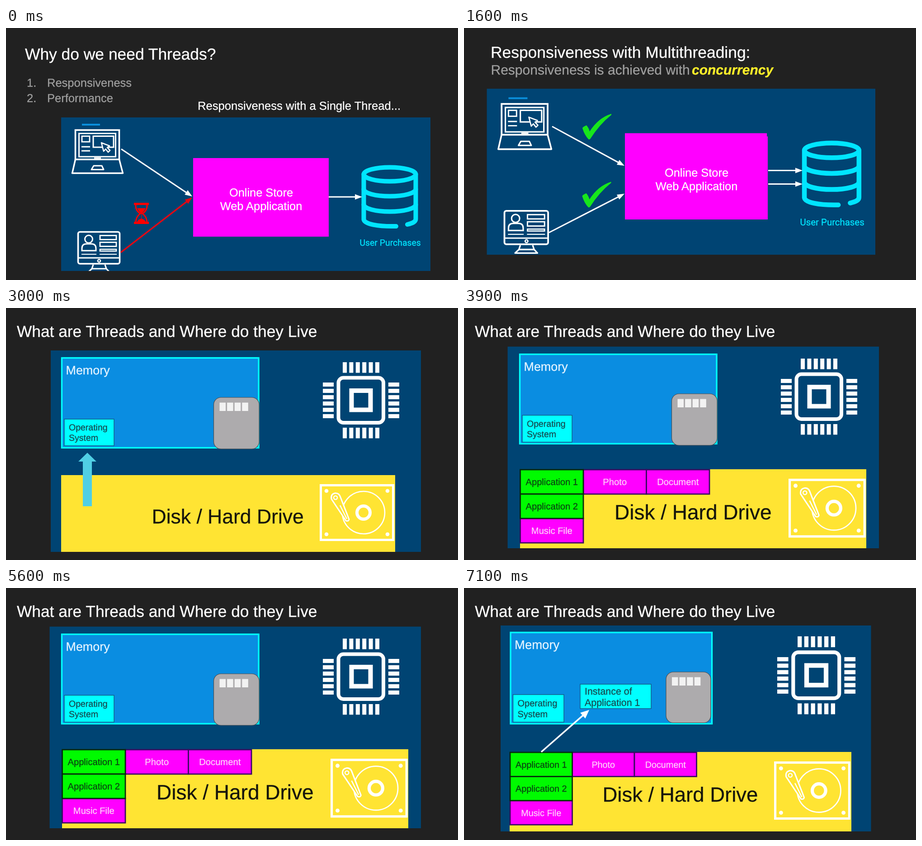
Recreate the animation shown at these times as an HTML page. Size 1000 px wide and 558 px high, loop 7.2 s.

```html
<!DOCTYPE html>
<html lang="en">
<head>
<meta charset="utf-8">
<title>Threads slides</title>
<style>
  html, body { margin: 0; width: 100%; height: 100%; overflow: hidden; background: #212121; }
  svg { display: block; width: 100%; height: 100%; }
  text { font-family: "Liberation Sans", Arial, sans-serif; text-rendering: geometricPrecision; stroke-width: 0.3px; }
  .roboto { font-family: Roboto, sans-serif; }
</style>
</head>
<body>
<svg id="stage" viewBox="0 0 1000 558" xmlns="http://www.w3.org/2000/svg"></svg>
<script>
const NAVY = '#004473', CYAN = '#00e5ff', AQUA = '#00ffff', MAGENTA = '#ff00ff',
      GREEN = '#00fb00', YELLOW = '#ffe433', GREY = '#a0a0a0', WHITE = '#fff';
const LOOP = 7200;

// Drawing helpers. Boxes are given by their left, top, right and bottom edges.
const box = (l, t, r, b, fill, extra = '') =>
  `<rect x="${l}" y="${t}" width="${r - l}" height="${b - t}" fill="${fill}" ${extra}/>`;
const frame = (l, t, r, b, width, color = WHITE, extra = '') =>
  box(l, t, r, b, 'none', `stroke="${color}" stroke-width="${width}" ${extra}`);
const text = (x, y, size, str, fill = WHITE, extra = '') =>
  `<text x="${x}" y="${y}" font-size="${size}" fill="${fill}" stroke="${fill}" ${extra}>${str}</text>`;
const centered = (x, y, size, str, fill) => text(x, y, size, str, fill, 'text-anchor="middle"');
const path = (d, fill, extra = '') => `<path d="${d}" fill="${fill}" ${extra}/>`;
const stroke = (d, width, color = WHITE, extra = '') =>
  path(d, 'none', `stroke="${color}" stroke-width="${width}" ${extra}`);
const dot = (x, y, r, fill, extra = '') => `<circle cx="${x}" cy="${y}" r="${r}" fill="${fill}" ${extra}/>`;
const place = (x, y, scale, content) =>
  `<g transform="translate(${x} ${y}) scale(${scale})">${content}</g>`;
const repeat = (n, draw) => Array.from({ length: n }, (_, i) => draw(i)).join('');

function arrow(x1, y1, x2, y2, color = WHITE, width = 3, head = 16, half = 6) {
  const len = Math.hypot(x2 - x1, y2 - y1);
  const angle = Math.atan2(y2 - y1, x2 - x1) * 180 / Math.PI;
  return `<g transform="translate(${x1} ${y1}) rotate(${angle})">` +
    stroke(`M0 0H${len - head + 1}`, width, color) +
    path(`M${len} 0l${-head} ${-half}v${2 * half}z`, color) + '</g>';
}

const ROUND = 'stroke-linejoin="round"';

const laptop =
  stroke('M168 214H208', 4, '#0a8fdc') +
  frame(153.5, 226, 250.5, 291, 3.6) +
  frame(161.5, 233.5, 242.5, 285, 3) +
  frame(168, 239.5, 185, 252, 2.8) +
  stroke('M167 263H186M167 272H186', 2.8) +
  frame(193, 239.5, 238, 264, 3) +
  stroke('M195 288H210', 3) +
  stroke('M153.500 291L146.500 321.500H258.500L250.500 291', 3.4, WHITE, ROUND) +
  stroke('M194 305H212L216 313.500H189Z', 3, WHITE, ROUND) +
  path('M211 254L216 273L220.500 268L226 275L230 271L224 264.500L229 261Z', NAVY,
    `stroke="#fff" stroke-width="2.6" ${ROUND}`);

const monitor =
  frame(159.5, 451.5, 251.5, 522, 3.6, WHITE, 'rx="4"') +
  stroke('M161 509H251', 3) +
  dot(183, 467.5, 8.5, 'none', 'stroke="#fff" stroke-width="3"') +
  stroke('M168 493V488Q168 478 178 478H189Q199 478 199 488V493Z', 3) +
  repeat(2, i => frame(208, 459.5 + i * 15, 244, 468.5 + i * 15, 2.8)) +
  frame(208, 490, 244, 494, 2.6) +
  stroke('M167 501H200M207 501H245', 2.2) +
  dot(206, 515.5, 3, 'none', 'stroke="#fff" stroke-width="2.6"') +
  stroke('M193 524L190 533L182 540.500H229L222 533L219 524M190 533H222', 3.2, WHITE, ROUND);

const database = `<g fill="none" stroke="${CYAN}" stroke-width="10" stroke-linecap="round">
  <ellipse cx="849" cy="324" rx="57.500" ry="15.500"/>
  <path d="M791.500 324V424C793 434 822 440 863 439M888 435C900 432 906.500 429 906.500 423V324"/>
  <path d="M791.500 357A57.500 15.500 0 0 0 906.500 357M791.500 391A57.500 15.500 0 0 0 906.500 391"/></g>`;

const hourglass =
  path('M283 387H316V392H283ZM283 429H316V434H283Z', '#f00') +
  stroke('M287 391V396Q288 405 297 411Q288 417 287 430M312 391V396Q311 405 302 411Q311 417 312 430', 3, '#f00') +
  path('M290 399H309Q306 405 300 411V422Q307 424 309 429H290Q292 424 299 422V411Q293 405 290 399Z', '#f00');

const check = path('M262 222Q262 219 271 215.500Q276 221 278 229Q297 199 326 190V192.500Q300 213 279 246L276 247Q267 238 262 222Z', '#17e61c');

const icons = laptop + monitor + database;

const storeLabel = (x, y) =>
  centered(x, y, 25.4, 'Online Store') + centered(x, y + 30.5, 25.4, 'Web Application');

const singleThread = () =>
  text(42, 70, 35.4, 'Why do we need Threads?') +
  text(46, 130, 25.5, '1.', GREY) + text(91, 130, 25.5, 'Responsiveness', GREY) +
  text(46, 164, 25.5, '2.', GREY) + text(91, 164, 25.5, 'Performance', GREY) +
  text(424, 181, 25.6, 'Responsiveness with a Single Thread...') +
  box(122, 198, 939, 538, NAVY) +
  `<clipPath id="panel">${box(122, 198, 939, 538, WHITE)}</clipPath><g clip-path="url(#panel)">${icons}</g>` +
  arrow(255, 268, 412, 373) +
  arrow(254, 497, 412, 375, '#e00915', 3.4) +
  hourglass +
  box(414, 288, 714, 462, MAGENTA) + storeLabel(564.5, 372.5) +
  arrow(714, 374, 788, 374) +
  text(782.5, 482, 19.4, 'User Purchases', CYAN, 'class="roboto"');

const multiThread = () =>
  text(59, 66, 35.4, 'Responsiveness with Multithreading:') +
  text(59.5, 103, 30, 'Responsiveness is achieved with', GREY) +
  text(504, 103, 30, 'concurrency', '#fff02a', 'font-weight="bold" font-style="italic"') +
  box(50.5, 134.5, 910, 502, NAVY) +
  place(-78, -69.2, 1.05, icons) +
  arrow(195, 218, 355, 305) + arrow(188, 453, 355, 367) +
  check + place(-0.5, 150.5, 1, check) +
  path('M356 233H670V240H672V424H356Z', MAGENTA) + storeLabel(514.5, 328.5) +
  arrow(673, 315.5, 749, 315.5) + arrow(673, 345.5, 749, 345.5) +
  text(743.5, 437, 20.4, 'User Purchases', CYAN, 'class="roboto"');

const title = () => text(24, 64, 35.3, 'What are Threads and Where do they Live');

// The icons below have their own top left corner at 0, 0.
const cpu =
  frame(34.5, 34.5, 134, 134, 8, WHITE, 'rx="11"') +
  frame(63.5, 63, 105.5, 105.5, 10) +
  repeat(6, i => {
    const a = 44 + i * 14.4, b = 45 + i * 14;
    return box(a, 0, a + 9, 23.5, WHITE) + box(a, 145, a + 9, 168.5, WHITE) +
      box(0, b, 24, b + 9, WHITE) + box(145, b, 169, b + 9, WHITE);
  });

const drive =
  frame(2.5, 2.5, 162.5, 123.5, 5) +
  [15, 150].map(x => dot(x, 15, 4.3, WHITE) + dot(x, 111, 4.3, WHITE)).join('') +
  dot(97, 63, 47, 'none', 'stroke="#fff" stroke-width="2.600"') +
  dot(97, 63, 14.5, 'none', 'stroke="#fff" stroke-width="7"') +
  path('M26 33Q24 22 34 20Q43 19 46 29L65 78Q64 83 58 81Z', YELLOW,
    `stroke="#fff" stroke-width="3" ${ROUND}`) +
  dot(35, 30, 4, 'none', 'stroke="#fff" stroke-width="2.400"') +
  stroke('M45 47L60 77', 2.4);

const card = (l, t, r, b) =>
  box(l, t, r, b, '#adabad', 'rx="16" stroke="#4c4c50" stroke-width="1.200"') +
  repeat(4, i => box(l + 13 + i * 16.6, t + 11.5, l + 26.5 + i * 16.6, t + 30, '#f2f2f2'));

const memory = (l, t, r, b, size) =>
  box(l, t, r, b, '#0a8de1', `stroke="${AQUA}" stroke-width="3.400"`) +
  text(l + 9, t + 36, size, 'Memory', '#e6f4ff');

const note = (l, t, r, b, size, lines, gap) =>
  box(l, t, r, b, AQUA, 'stroke="#14527c" stroke-width="1.300"') +
  lines.map((s, i) => text(l + 10, t + gap[0] + i * gap[1], size, s, '#174a50')).join('');

function files(l, t, w, h, size) {
  const tile = (col, row, name, app) => {
    const x = l + col * w, y = t + row * h;
    return box(x, y, x + w, y + h, app ? GREEN : MAGENTA,
      `stroke="${app ? '#062b0c' : '#3a0a63'}" stroke-width="2.800"`) +
      centered(x + w / 2, y + h / 2 + 7, size, name, app ? '#0a4512' : '#ffd0fb');
  };
  return tile(1, 0, 'Photo') + tile(2, 0, 'Document') + tile(0, 2, 'Music File') +
    tile(0, 0, 'Application 1', true) + tile(0, 1, 'Application 2', true);
}

const diskLabel = (x, y, size) => text(x, y, size, 'Disk / Hard Drive', '#16160c');

const osLines = ['Operating', 'System'];

const loadSystem = () =>
  title() + box(99, 94, 918, 540, NAVY) +
  memory(123.5, 110.5, 559, 309.5, 26.9) +
  note(129, 246, 239, 305, 19.5, osLines, [25, 23]) +
  card(459.5, 198, 560, 312) +
  place(701, 120, 1, cpu) +
  box(122, 370, 861, 540, YELLOW) +
  diskLabel(322.5, 477, 44.5) +
  place(694, 390, 1, drive) +
  path('M180 320.500L200 340H190V439H170V340H160Z', '#50cfe4');

const diskFiles = () =>
  title() + box(96.5, 85.500, 918, 532, NAVY) +
  memory(123.5, 102.5, 559, 300.5, 26.9) +
  note(129, 237.5, 239, 297, 19.5, osLines, [25.500, 23]) +
  card(459.5, 190, 560, 304) +
  place(701, 112, 1, cpu) +
  box(124, 357, 890, 532, YELLOW) +
  files(124.5, 358, 139.5, 54, 20.2) +
  diskLabel(333, 468, 46) +
  place(718, 378, 1.035, drive);

const runApp = () =>
  title() + box(81, 83, 900.5, 539, NAVY) +
  memory(103, 98.5, 548.5, 300.5, 27.5) +
  note(108.5, 236, 221, 297, 20, osLines, [26, 24]) +
  note(257, 213, 414, 267, 21.4, ['Instance of', 'Application 1'], [23, 25]) +
  card(447, 186, 546, 298.5) +
  place(693, 107, 1.024, cpu) +
  box(101, 363, 857, 539, YELLOW) +
  files(102, 364, 137.5, 53.4, 19.8) +
  diskLabel(306.5, 473, 45.5) +
  place(686, 384, 1.024, drive) +
  arrow(171, 363, 277, 270, WHITE, 3.6, 19, 8.5);

const slides = [
  { start: 0, draw: singleThread },
  { start: 1600, draw: multiThread },
  { start: 2900, draw: loadSystem },
  { start: 3900, draw: diskFiles },
  { start: 5700, draw: runApp }
];

const stage = document.getElementById('stage');
stage.innerHTML = box(0, 0, 1000, 558, '#212121') +
  slides.map(s => `<g class="slide">${s.draw()}</g>`).join('');
const groups = [...stage.querySelectorAll('.slide')];

function update(ms) {
  const t = ms % LOOP;
  const current = slides.filter(s => s.start <= t).length - 1;
  groups.forEach((g, i) => g.setAttribute('display', i === current ? 'inline' : 'none'));
}

const began = performance.now();
function tick() {
  update(performance.now() - began);
  requestAnimationFrame(tick);
}
tick();
</script>
</body>
</html>
```
